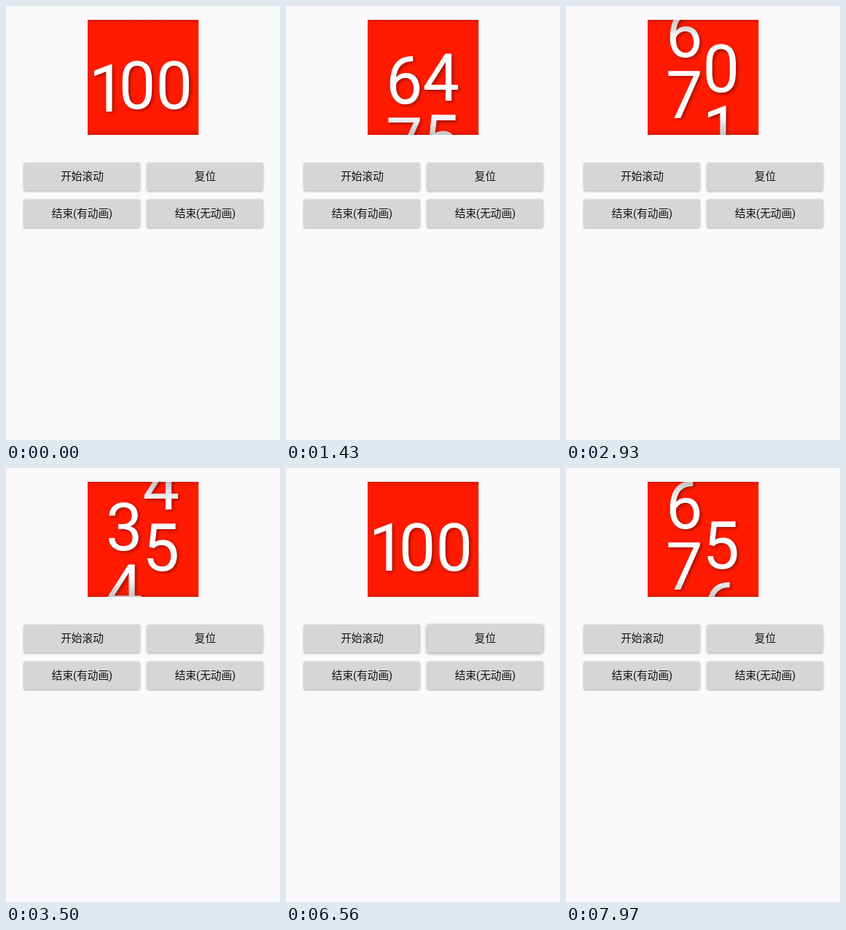
Animation of 376x596 px, one loop 8000 ms. Source, as an HTML page with a canvas:

```html
<!DOCTYPE html>
<html lang="zh-CN">
<head>
<meta charset="utf-8">
<style>
html, body { margin: 0; width: 376px; height: 596px; overflow: hidden; }
canvas { display: block; }
</style>
</head>
<body>
<canvas id="stage" width="376" height="596"></canvas>
<script>
const ctx = document.getElementById('stage').getContext('2d');
const LOOP = 8000, STEP = 30, FIRST = 500;
const LINE = 84, BASE = 140.5;
const BOX = { x: 112, y: 19, w: 152.5, h: 158 };

// Press times are in ms; each press shows a soft ripple.
const buttons = [
  { text: '开始滚动', x: 24.5, y: 215, presses: [[500, 790], [7130, 7427]] },
  { text: '复位', x: 193.5, y: 215, presses: [[6560, 6680]] },
  { text: '结束(有动画)', x: 24.5, y: 265.5, presses: [[3740, 4040]] },
  { text: '结束(无动画)', x: 193.5, y: 265.5, presses: [] }
];

// [time, digits the tens column has rolled]
const firstRoll = [[790, 0], [1430, 3.92], [2030, 7.54], [2930, 13.155], [4040, 20]];
const rollEnd = 4040, settleEnd = 4130, secondRoll = 7427;

function along(points, t) {
  const i = Math.max(1, points.findIndex(p => p[0] >= t));
  const [t0, v0] = points[i - 1], [t1, v1] = points[i];
  return v0 + (v1 - v0) * (t - t0) / (t1 - t0);
}

function shadow(color, x, y, blur) {
  ctx.shadowColor = color;
  ctx.shadowOffsetX = x;
  ctx.shadowOffsetY = y;
  ctx.shadowBlur = blur;
}

// Vertical gradient over the box: edge colour within `depth` px of top and bottom.
function edgeGradient(edge, middle, depth) {
  const g = ctx.createLinearGradient(0, BOX.y, 0, BOX.y + BOX.h);
  const d = depth / BOX.h;
  g.addColorStop(0, edge);
  g.addColorStop(d, middle);
  g.addColorStop(1 - d, middle);
  g.addColorStop(1, edge);
  return g;
}

function drawButton({ text, x, y, presses }, t) {
  const w = 159, h = 38.5;
  const press = presses.find(([a, b]) => t >= a && t < b);
  ctx.save();
  ctx.beginPath();
  ctx.roundRect(x, y, w, h, 2);
  shadow(press ? 'rgba(0,0,0,.42)' : 'rgba(0,0,0,.32)', 0, 1, press ? 4 : 3);
  ctx.fillStyle = '#d6d6d6';
  ctx.fill();
  shadow('transparent', 0, 0, 0);
  if (press) {
    const k = (t - press[0]) / (press[1] - press[0]);
    ctx.clip();
    ctx.beginPath();
    ctx.arc(x + w / 2, y + h / 2, 20 + 65 * k, 0, 7);
    ctx.fillStyle = `rgba(0,0,0,${0.05 * Math.sin(Math.PI * k)})`;
    ctx.fill();
  }
  ctx.restore();
  ctx.font = '14.67px Roboto, "Noto Sans CJK SC", "Noto Sans CJK", sans-serif';
  ctx.textAlign = 'center';
  ctx.fillStyle = '#141414';
  ctx.fillText(text, x + w / 2 + 0.5, Math.round(y + 24));
}

// Only the current digit and the one below it are visible.
function drawColumn(x, pos) {
  const top = Math.floor(pos);
  for (const k of [top, top + 1]) {
    ctx.fillText(((k % 10) + 10) % 10, x, BASE + (k - pos) * LINE);
  }
}

function drawHundred(drop) {
  ctx.fillText('1', 113.5, BASE + drop);
  ctx.fillText('0', 154.7, BASE);
  ctx.fillText('0', 205.5, BASE);
}

function drawNumber(t) {
  const { x, y, w, h } = BOX;
  ctx.save();
  ctx.beginPath();
  ctx.rect(x, y, w, h);
  ctx.clip();
  ctx.fillStyle = '#ff1a00';
  ctx.fillRect(x, y, w, h);
  ctx.fillStyle = edgeGradient('rgba(0,0,0,.14)', 'rgba(0,0,0,0)', 7);
  ctx.fillRect(x, y, w, h);

  ctx.font = '90px Roboto, sans-serif';
  ctx.textAlign = 'left';
  ctx.fillStyle = edgeGradient('#c4c4c4', '#fff', 28);
  shadow('rgba(0,0,0,.34)', 2.5, 2.5, 4);
  let rolled = null;
  if (t >= firstRoll[0][0] && t < rollEnd) rolled = along(firstRoll, t);
  if (t >= secondRoll) rolled = (t - secondRoll) * 0.0061;
  if (rolled !== null) {
    drawColumn(137, -rolled);
    drawColumn(187.5, -1.5 * rolled);
  } else if (t < rollEnd) {
    drawHundred(4);
  } else {
    const left = Math.max(0, (settleEnd - t) / (settleEnd - rollEnd));
    drawHundred(LINE * left * left);
  }
  ctx.restore();
}

function frame(now) {
  const raw = now % LOOP;
  const t = raw < FIRST ? 0 : FIRST + Math.floor((raw - FIRST) / STEP) * STEP;
  ctx.fillStyle = t < FIRST ? '#f9f9f9' : '#fbf9fc';
  ctx.fillRect(0, 0, 376, 596);
  buttons.forEach(b => drawButton(b, t));
  drawNumber(t);
}

const start = performance.now();
function tick() {
  frame(performance.now() - start);
  requestAnimationFrame(tick);
}
tick();
</script>
</body>
</html>
```
